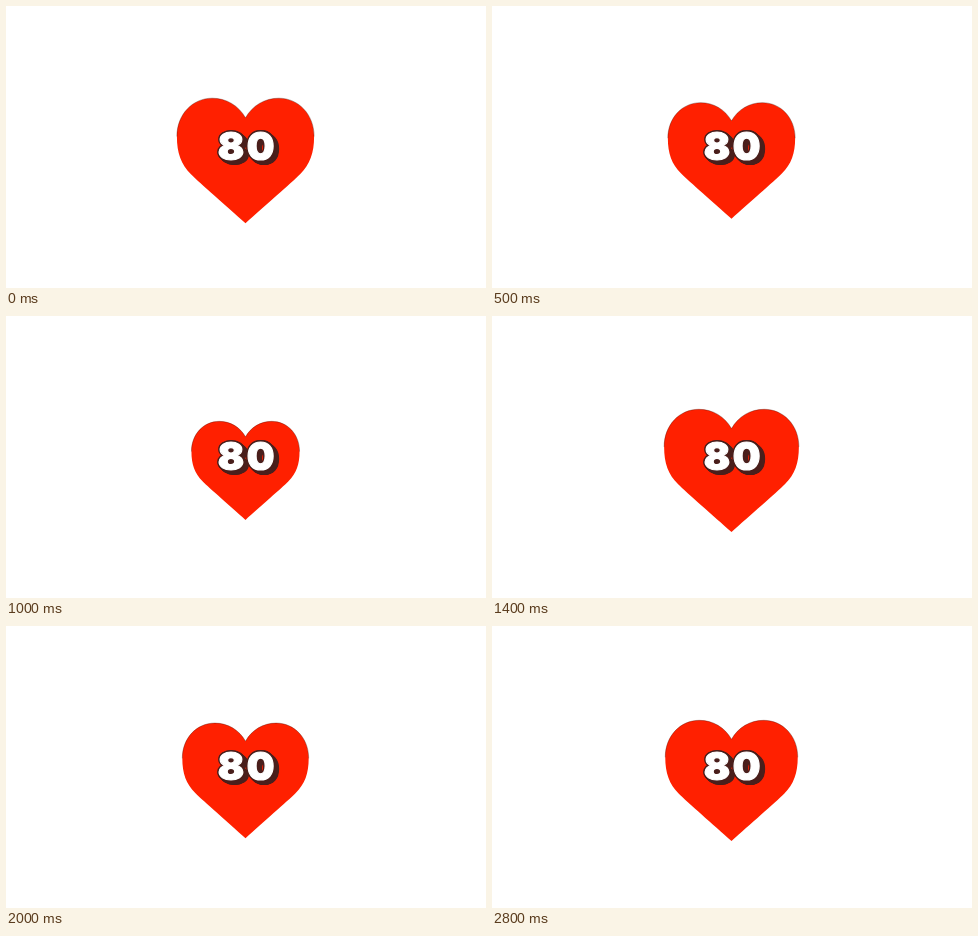
Recreate the animation shown at these times as an HTML page with a canvas. Size 480x282 px, loop 2.9 s.

```html
<!DOCTYPE html>
<html lang="en">
<head>
<meta charset="utf-8">
<title>Beating heart</title>
<style>
  html, body { margin: 0; width: 100%; height: 100%; overflow: hidden; background: #fff; }
  canvas { display: block; }
</style>
</head>
<body>
<canvas id="stage" width="480" height="282"></canvas>
<script>
const ctx = document.getElementById('stage').getContext('2d');
const LOOP = 2900, STEP = 100;
const CENTER = { x: 239.5, y: 154.3 };
const PEAKS = [130, 1615, 3071];
const MAX_WIDTH = 138.6;
const SWING = 0.063 * Math.PI / 180; // radians per ms

// Outlines in a 24-unit box; the heart is 20 units wide.
const LOBES = 'M2 8.7C2 5.5 4.25 3.12 7.15 3.12C9.2 3.12 11 4.2 12 5.98' +
  'C13 4.2 14.8 3.12 16.85 3.12C19.75 3.12 22 5.5 22 8.7';
const lobes = new Path2D(LOBES);
const heart = new Path2D(LOBES +
  'C22 11.1 21.4 12.75 19.95 14.2C18.65 15.5 14.7 18.9 12 21.35' +
  'C9.3 18.9 5.35 15.5 4.05 14.2C2.6 12.75 2 11.1 2 8.7Z');

// Rounded peaks that meet in sharp minima.
function heartWidth(t) {
  const nearest = Math.min(...PEAKS.map(p => Math.abs(t - p)));
  return MAX_WIDTH * Math.cos(nearest * SWING);
}

function drawHeart(width) {
  const scale = width / 20;
  ctx.save();
  ctx.translate(CENTER.x, CENTER.y);
  ctx.scale(scale, scale);
  ctx.translate(-12, -12.175);
  ctx.fillStyle = '#ff2000';
  ctx.fill(heart);
  ctx.lineWidth = 0.6 / scale;
  ctx.strokeStyle = 'rgba(60, 10, 0, 0.55)';
  ctx.stroke(lobes);
  ctx.restore();
}

function drawNumber(text, x, y) {
  ctx.font = '900 39px Inter, sans-serif';
  ctx.letterSpacing = '2.6px';
  ctx.textAlign = 'center';
  ctx.lineJoin = 'round';
  ctx.lineWidth = 4;
  ctx.strokeStyle = '#4a1f1c';
  for (let d = 0; d <= 4; d += 0.5) ctx.strokeText(text, x + d, y + d * 0.85);
  ctx.lineWidth = 1.2;
  ctx.strokeStyle = ctx.fillStyle = '#fff';
  ctx.strokeText(text, x, y);
  ctx.fillText(text, x, y);
}

function draw(now) {
  const t = Math.floor((now % LOOP) / STEP) * STEP;
  ctx.fillStyle = '#fff';
  ctx.fillRect(0, 0, 480, 282);
  drawHeart(heartWidth(t));
  drawNumber('80', 241.5, 154);
}

let start;
function tick(now) {
  start ??= now;
  draw(Math.max(0, now - start));
  requestAnimationFrame(tick);
}
draw(0);
requestAnimationFrame(tick);
</script>
</body>
</html>
```
